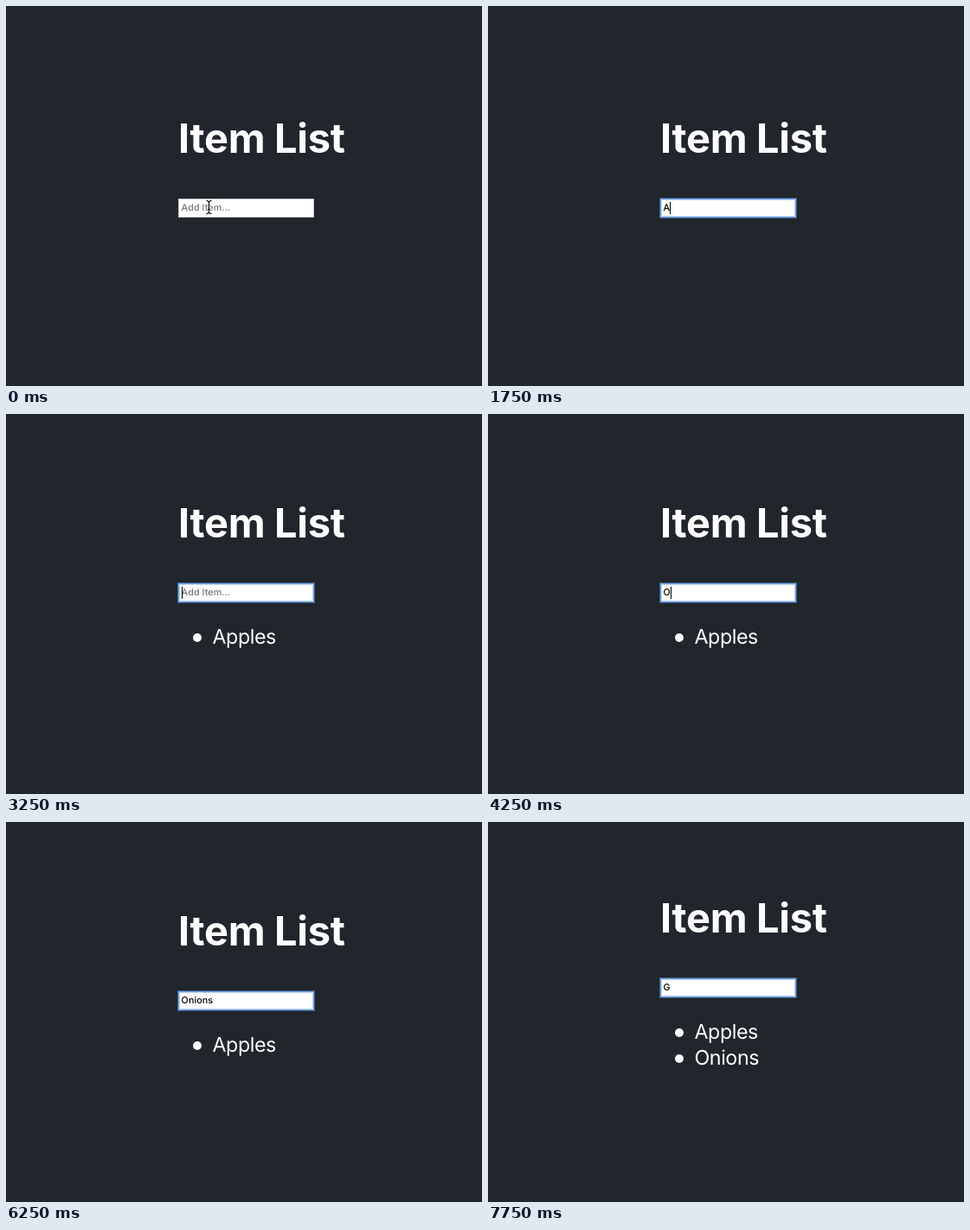
Write an HTML page that moves like this. It is 550 by 440 pixels and loops after 8 s.

```html
<!DOCTYPE html>
<html lang="en">
<head>
<meta charset="utf-8">
<title>Item List</title>
<style>
  html, body { margin: 0; width: 100%; height: 100%; overflow: hidden; background: #21252c; }
  #stage { position: relative; width: 550px; height: 440px; overflow: hidden; font-family: Inter, sans-serif; color: #fff; }
  #page { position: absolute; left: 0; top: 0; width: 550px; }
  #page > * { position: absolute; margin: 0; padding: 0; white-space: pre; }
  h1 { left: 199px; top: 123px; font-size: 47px; line-height: 60px; font-weight: 700; letter-spacing: -0.32px; }
  #field { box-sizing: border-box; left: 199px; top: 223px; width: 157px; height: 22px; background: #fff; border: 1px solid #c4c6c9; }
  #field.focus { border-color: #74a6e4; box-shadow: 0 0 0 1px rgba(90, 143, 210, .55), inset 0 0 0 1px #b9d3f3; }
  #hint, #typed { left: 202.6px; top: 227px; height: 14px; font-size: 10.7px; line-height: 14px; font-weight: 500; letter-spacing: .1px; text-rendering: geometricPrecision; }
  #hint { color: #757575; }
  #typed { color: #000; }
  #caret { display: inline-block; width: 1px; height: 14px; background: #000; vertical-align: top; }
  ul { left: 238.5px; top: 270px; list-style: none; font-size: 23.3px; line-height: 30px; letter-spacing: -0.45px; text-rendering: geometricPrecision; }
  li { position: relative; height: 30px; }
  li::before { content: ""; position: absolute; left: -22.5px; top: 10.5px; width: 10px; height: 10px; border-radius: 50%; background: #fff; }
  #pointer { left: 230px; top: 224px; }
  [hidden] { display: none !important; }
</style>
</head>
<body>
<div id="stage">
  <div id="page">
    <h1>Item List</h1>
    <div id="field"></div>
    <div id="hint">Add Item...</div>
    <div id="typed"><span id="text"></span><span id="caret"></span></div>
    <ul><li id="first">Apples</li><li id="second">Onions</li></ul>
    <svg id="pointer" width="9" height="18" fill="none">
      <defs><path id="beam" d="M1.5 1.5H3L4.5 3L6 1.5H7.5M4.5 3V15M1.5 16.5H3L4.5 15L6 16.5H7.5M3 11.5H6"/></defs>
      <use href="#beam" stroke="#fff" stroke-width="2.4"/>
      <use href="#beam" stroke="#000" stroke-width="1.1"/>
    </svg>
  </div>
</div>
<script>
  const LOOP = 8000;
  const SHIFT = [0, -27, -42];
  // [start ms, items listed, typed text, caret visible]
  const steps = [
    [0, 0, "", 0], [500, 0, "", 1], [750, 0, "", 0], [1250, 0, "", 1],
    [1750, 0, "A", 1], [2000, 0, "A", 0], [2250, 0, "Ap", 1],
    [2500, 0, "Appl", 1], [2750, 0, "Apple", 1], [3000, 0, "Apples", 1],
    [3250, 1, "", 1], [3500, 1, "", 0], [4000, 1, "", 1],
    [4250, 1, "O", 1], [4750, 1, "Oni", 1], [5000, 1, "Onio", 1],
    [5250, 1, "Onion", 1], [5500, 1, "Onions", 1], [6250, 1, "Onions", 0],
    [6500, 2, "", 1], [7000, 2, "", 0], [7500, 2, "G", 1], [7750, 2, "G", 0]
  ];
  const el = id => document.getElementById(id);

  function draw(now) {
    const t = now % LOOP;
    const [, items, text, caret] = steps.findLast(s => s[0] <= t);
    el("page").style.top = SHIFT[items] + "px";
    el("field").classList.toggle("focus", t >= 500);
    el("text").textContent = text;
    el("hint").hidden = text !== "";
    el("caret").hidden = !caret;
    el("first").hidden = items < 1;
    el("second").hidden = items < 2;
    el("pointer").style.visibility = t < 1500 ? "visible" : "hidden";
    requestAnimationFrame(draw);
  }
  draw(performance.now());
</script>
</body>
</html>
```
